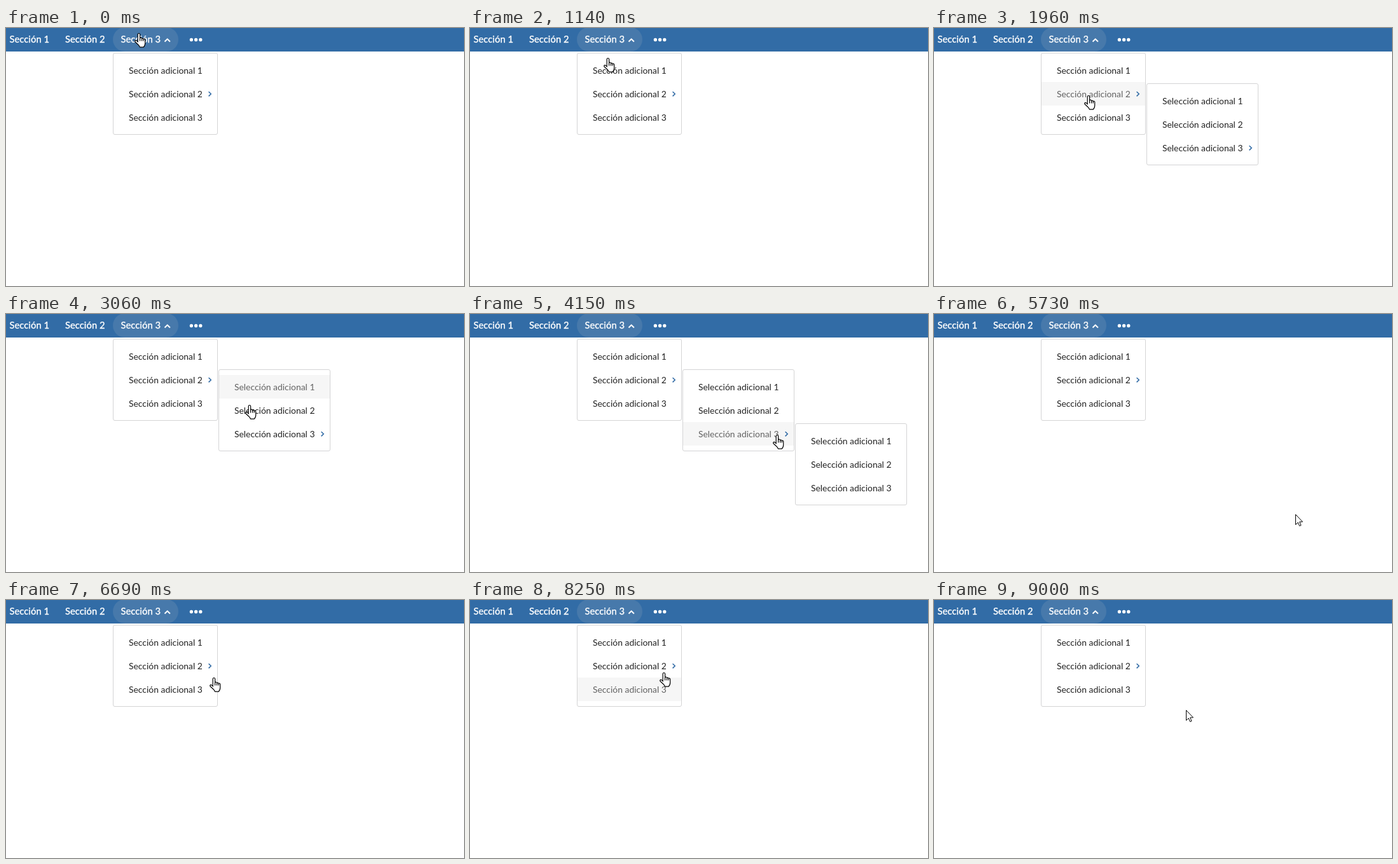
Recreate the animation shown at these times as an HTML page. Size 720 by 406 pixels, loop 9.35 s.

```html
<!DOCTYPE html>
<html lang="es">
<head>
<meta charset="utf-8">
<title>Menú desplegable</title>
<style>
  html, body { margin: 0; width: 100%; height: 100%; overflow: hidden; background: #fff; }
  #stage { position: relative; width: 720px; height: 406px; overflow: hidden; font-family: Lato, sans-serif; }
  nav { position: absolute; inset: 0 0 auto; height: 37px; background: #326ca6; color: #fff; font: 500 14.8px/35px Lato, sans-serif; }
  nav span { position: absolute; top: 0; white-space: nowrap; -webkit-text-stroke: .25px #fff; }
  .pill { position: absolute; left: 168px; top: -1px; width: 103px; height: 38px; border-radius: 19px; background: #4779ab; }
  svg { position: absolute; overflow: visible; fill: none; }
  .panel { position: absolute; box-sizing: border-box; height: 129px; padding: 8px 0; border: 1px solid #d4d4d5; border-radius: 3px; background: #fff; }
  .row { position: relative; height: 37px; padding-left: 24px; font-size: 13.9px; line-height: 37px; white-space: nowrap; }
  .row svg { right: 9.5px; top: 15px; stroke: #326ca6; stroke-width: 1.6; }
  .cursor { left: 0; top: 0; fill: #fff; stroke: #000; stroke-linejoin: round; }
</style>
</head>
<body>
<div id="stage">
  <nav>
    <div class="pill"></div>
    <span style="left:5.5px">Sección 1</span>
    <span style="left:93px">Sección 2</span>
    <span style="left:180.5px">Sección 3</span>
    <svg width="320" height="37" style="left:0;top:0">
      <path d="M249.5 21.5l4.2-4.2 4.2 4.2" stroke="#fff" stroke-width="2"/>
      <path d="M291.4 18.5h.01m7.2 0h.01m7.2 0h.01" stroke="#fff" stroke-width="5.3" stroke-linecap="round"/>
    </svg>
  </nav>
</div>
<script>
const LOOP = 9350, STEP = 70, ROW = 37;
const stage = document.getElementById('stage');

// Each menu hangs beside the row "parent" of the one before it
const panels = [
  { x: 168, y: 39, w: 165, word: 'Sección', parent: 1 },
  { x: 334, y: 87, w: 176, word: 'Selección', parent: 2 },
  { x: 511, y: 172, w: 176, word: 'Selección' }
];

// Pointer moves: start, end, destination
const home = [209, 8];
const moves = [
  [790, 1690, 228, 105], [1960, 2170, 324, 109], [2310, 2650, 385, 112],
  [2850, 3340, 380, 174], [3540, 3680, 382, 179],
  [3940, 4150, 483, 190], [4220, 4430, 548, 193], [4630, 5050, 565, 279],
  [5660, 5730, 568, 315], [5800, 6130, 470, 331], [6200, 6550, 337, 137],
  [6620, 6830, 317, 106], [7430, 7710, 301, 142], [8040, 8450, 308, 97],
  [8720, 8790, 315, 135], [8860, 9000, 396, 173]
];

function addPanel(p) {
  p.box = document.createElement('div');
  p.box.className = 'panel';
  p.box.style.cssText = `left:${p.x}px;top:${p.y}px;width:${p.w}px`;
  p.rows = [0, 1, 2].map(i => {
    const row = document.createElement('div');
    row.className = 'row';
    row.textContent = `${p.word} adicional ${i + 1}`;
    if (i === p.parent) row.innerHTML += '<svg width="5" height="8"><path d="M.6.2l3.6 3.6-3.6 3.6"/></svg>';
    p.box.append(row);
    return row;
  });
  stage.append(p.box);
}
panels.forEach(addPanel);
const rows = panels.flatMap(p => p.rows);

stage.insertAdjacentHTML('beforeend', `
  <svg class="cursor" width="18" height="25">
    <g id="hand" stroke-width="1.2" transform="translate(-7 0)">
      <path d="M5.2 14V2.2a1.7 1.7 0 0 1 3.4 0V8a1.6 1.6 0 0 1 3 .8a1.5 1.5 0 0 1 2.7.8a1.4 1.4 0 0 1 2.4 1V16q0 4-2.6 6.2H8.4q-.6-2-2.6-4L1 13.8q-.8-2 1-2.4q1.4 0 3.2 2.6z"/>
      <path d="M8.6 8v4.5M11.6 8.8v3.7M14.3 9.6v2.9"/>
    </g>
    <path id="arrow" d="M.5.5V16.5L4.2 13L6.6 18.5L9 17.5L6.7 12H11.5z"/>
  </svg>`);
const cursor = stage.querySelector('.cursor');
const hand = document.getElementById('hand');
const arrow = document.getElementById('arrow');

const mix = (a, b, k) => a + (b - a) * k;
const grey = v => `rgb(${v},${v},${v})`;
const ease = p => p * p * (3 - 2 * p);

// Index of the topmost open panel under the pointer, or -1
const panelAt = ([x, y], level) => panels.findLastIndex((p, i) =>
  i <= level && x >= p.x && x < p.x + p.w && y >= p.y && y < p.y + 129);

// Plays the pointer through the menu once and keeps every screen
function simulate() {
  const glow = rows.map(() => 0);
  const screens = [];
  let level = 0, seen = home;

  function react() {
    const at = panelAt(seen, level);
    const row = at < 0 ? -1 : Math.floor((seen[1] - panels[at].y - 9) / ROW);
    level = at < 0 ? 0 : row === panels[at].parent ? at + 1 : at;
    const lit = row >= 0 && row < 3 ? at * 3 + row : -1;
    glow.forEach((g, i) => { glow[i] = Math.max(0, Math.min(1, g + (i === lit ? .5 : -.5))); });
  }
  function record(t) {
    const pointing = seen[1] < 39 || panelAt(seen, level) >= 0;
    screens.push({ t, tip: seen, level, pointing, glow: [...glow] });
  }

  record(0);
  for (const [start, end, x, y] of moves) {
    const [x0, y0] = seen;
    for (let t = start; ; t = Math.min(t + STEP, end)) {
      const k = ease((t - start + STEP) / (end - start + STEP));
      react(); // the menu lags one step behind the pointer
      seen = [mix(x0, x, k), mix(y0, y, k)];
      if (t === end) { react(); react(); }
      record(t);
      if (t === end) break;
    }
  }
  return screens;
}
const screens = simulate();

function draw(t) {
  const { tip, level, pointing, glow } = screens.findLast(s => s.t <= t);
  rows.forEach((row, i) => {
    row.style.color = grey(mix(33, 98, glow[i]));
    row.style.background = grey(mix(255, 246, glow[i]));
  });
  panels.forEach((p, i) => { p.box.style.display = i <= level ? '' : 'none'; });
  hand.style.display = pointing ? '' : 'none';
  arrow.style.display = pointing ? 'none' : '';
  cursor.style.transform = `translate(${tip.map(v => Math.round(v) + 'px')})`;
}

const begin = performance.now();
function tick() {
  draw((performance.now() - begin) % LOOP);
  requestAnimationFrame(tick);
}
tick();
</script>
</body>
</html>
```
